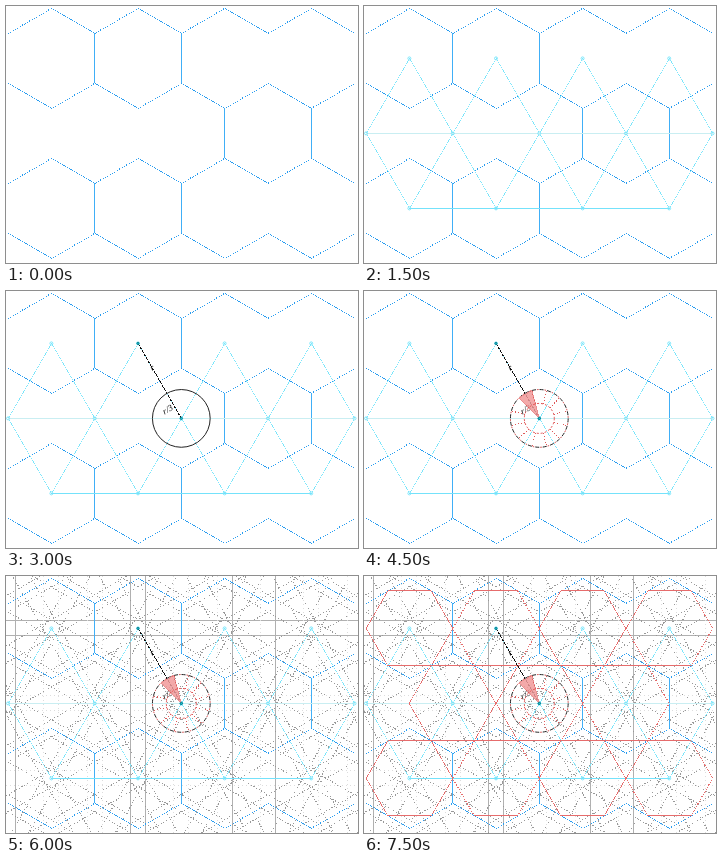
Animation, 352 px wide and 257 px high, one loop 8 s. Source, as an HTML page:

```html
<!DOCTYPE html>
<html lang="en">
<head>
<meta charset="utf-8">
<title>Hexagonal lattice construction</title>
<style>
html, body { margin: 0; width: 100%; height: 100%; overflow: hidden; background: #fff; }
svg { display: block; width: 352px; height: 257px; }
path, circle { fill: none; stroke-width: 1; }
path { shape-rendering: crispEdges; }
.step { opacity: 0; animation: 8s step-end infinite; }
#lattice { animation-name: show1; }
#radius { animation-name: show2; }
#sector { animation-name: show3; }
#guides { animation-name: show4; }
#kagome { animation-name: show5; }
#rim { animation: break 8s step-end infinite; }
@keyframes show1 { 0% { opacity: 0 } 18.75%, 100% { opacity: 1 } }
@keyframes show2 { 0% { opacity: 0 } 37.5%, 100% { opacity: 1 } }
@keyframes show3 { 0% { opacity: 0 } 56.25%, 100% { opacity: 1 } }
@keyframes show4 { 0% { opacity: 0 } 75%, 100% { opacity: 1 } }
@keyframes show5 { 0% { opacity: 0 } 93.75%, 100% { opacity: 1 } }
@keyframes break { 0% { stroke-dasharray: none } 56.25%, 100% { stroke-dasharray: 4 3.56 } }
text { font: italic 9px "Liberation Serif", serif; fill: #111; text-anchor: middle; }
</style>
</head>
<body>
<svg viewBox="0 0 352 257">
  <g id="guides" class="step"></g>
  <g id="hexagons"></g>
  <g id="lattice" class="step"></g>
  <g id="kagome" class="step"></g>
  <g id="radius" class="step"></g>
  <g id="sector" class="step"></g>
</svg>
<script>
const SIDE = 50, HALF = SIDE * Math.sqrt(3) / 2, ROW = 75;
const X0 = 2.1, Y0 = 52.4, R = HALF * 2 / 3;
const at = (i, j) => [X0 + i * HALF, Y0 + j * ROW];
const polar = ([x, y], r, deg) => {
  const a = deg * Math.PI / 180;
  return [x + r * Math.cos(a), y - r * Math.sin(a)];
};
const pixel = v => Math.floor(v) + .5;

function add(layer, tag, attrs) {
  const el = document.createElementNS("http://www.w3.org/2000/svg", tag);
  for (const key in attrs) el.setAttribute(key, attrs[key]);
  document.getElementById(layer).append(el);
  return el;
}
const line = (layer, points, stroke, extra = {}) =>
  add(layer, "path", { d: "M" + points.map(p => p.join()).join("L"), stroke, ...extra });
const ring = (layer, [cx, cy], r, stroke, extra = {}) =>
  add(layer, "circle", { cx, cy, r, stroke, ...extra });
const dash = value => ({ "stroke-dasharray": value });
const dots = dash("1 1");

// Zigzag across the stage; phase picks which columns are high.
const zigzag = (y, phase) =>
  Array.from({ length: 9 }, (_, i) => [X0 + i * HALF, y + ((i + phase) % 2 ? 0 : 25)]);

function drawHexagons() {
  const top = Y0 - SIDE;
  for (const [y, phase] of [[0, 0], [75, 1], [150, 0], [225, 1]])
    line("hexagons", zigzag(top + y, phase), "#2a9df0", dots);
  for (const [i, y] of [[2, 25], [4, 25], [5, 100], [7, 100], [2, 175], [4, 175]]) {
    const x = pixel(X0 + i * HALF);
    line("hexagons", [[x, top + y], [x, top + y + SIDE]], "#40aff7");
  }
}

function drawLattice() {
  const cyan = "#7ce6fb";
  for (const flip of [0, 2])
    line("lattice", Array.from({ length: 9 }, (_, i) => at(i, i % 2 ? flip : 1)), cyan, dots);
  line("lattice", [[X0, 127.5], [349, 127.5]], "#c9eef2");
  line("lattice", [[45, 202.5], [305, 202.5]], "#74e2fb");
  for (let j = 0; j < 3; j++)
    for (let i = j === 1 ? 0 : 1; i < 9; i += 2)
      ring("lattice", at(i, j), 1.5, cyan, { "stroke-width": .6 });
}

const hub = at(4, 1), tip = at(3, 0);

function drawRadius() {
  line("radius", [tip, hub], "#111", dash("3 1"));
  ring("radius", hub, R, "#222", { id: "rim", "stroke-width": .9 });
  for (const p of [tip, hub]) ring("radius", p, 1.1, "#087e8c", { style: "fill:#25cbdc" });
  const label = (x, y, text) =>
    add("radius", "text", { transform: `translate(${x} ${y}) rotate(-30)` }).textContent = text;
  label(147.5, 79, "r");
  label(163, 121, "r/3");
}

function drawSector() {
  const a = polar(hub, R, 105), b = polar(hub, R, 135);
  line("sector", [hub, a, b, hub], "#e99090", { style: "fill:#f19a9a;fill-opacity:.85" });
  ring("sector", hub, R, "#cf3434", { ...dash("1.5 6.06"), "stroke-dashoffset": -5 });
  ring("sector", hub, 15, "#df4a4a", { ...dash("2 2"), "stroke-width": .8 });
  for (let deg = 15; deg < 360; deg += 30)
    line("sector", [polar(hub, 15, deg), polar(hub, R, deg)], "#df5a5a", dash("1 2"));
  ring("sector", hub, 1.1, "#087e8c", { style: "fill:#25cbdc" });
}

// Parallels beside every lattice point, in six directions.
function drawGuides() {
  const offset = R * Math.sin(Math.PI / 12);
  const strong = [9, 124, 139, 226, 269, 44, 59];
  for (let deg = 0; deg < 180; deg += 30) {
    const a = deg * Math.PI / 180, dx = Math.cos(a), dy = -Math.sin(a);
    const gap = deg % 60 ? HALF : ROW;
    for (let k = -9; k <= 9; k++)
      for (const side of [-offset, offset]) {
        const d = k * gap + side;
        const x = hub[0] - dy * d, y = hub[1] + dx * d;
        if (deg % 90) {
          line("guides", [[x - 450 * dx, y - 450 * dy], [x + 450 * dx, y + 450 * dy]], "#999", dash("1 2"));
          continue;
        }
        const p = pixel(deg ? x : y);
        const style = strong.includes(p - .5) ? ["#b0b0b0"] : ["#ddd", dash("1 3")];
        line("guides", deg ? [[p, 0], [p, 257]] : [[0, p], [352, p]], ...style);
      }
  }
}

function drawKagome() {
  for (let j = 0; j < 3; j++)
    for (let i = j === 1 ? 2 : 1; i < 8; i += 2)
      for (let deg = 0; deg < 360; deg += 60) {
        const ends = [deg, deg + 60].map(d => polar(at(i, j), HALF, d));
        const level = deg % 180 === 60;
        line("kagome", level ? ends.map(([x, y]) => [x, pixel(y)]) : ends,
          "#e66c6c", level ? {} : dash("1.2 .8"));
      }
}

drawGuides();
drawHexagons();
drawLattice();
drawKagome();
drawRadius();
drawSector();
</script>
</body>
</html>
```
